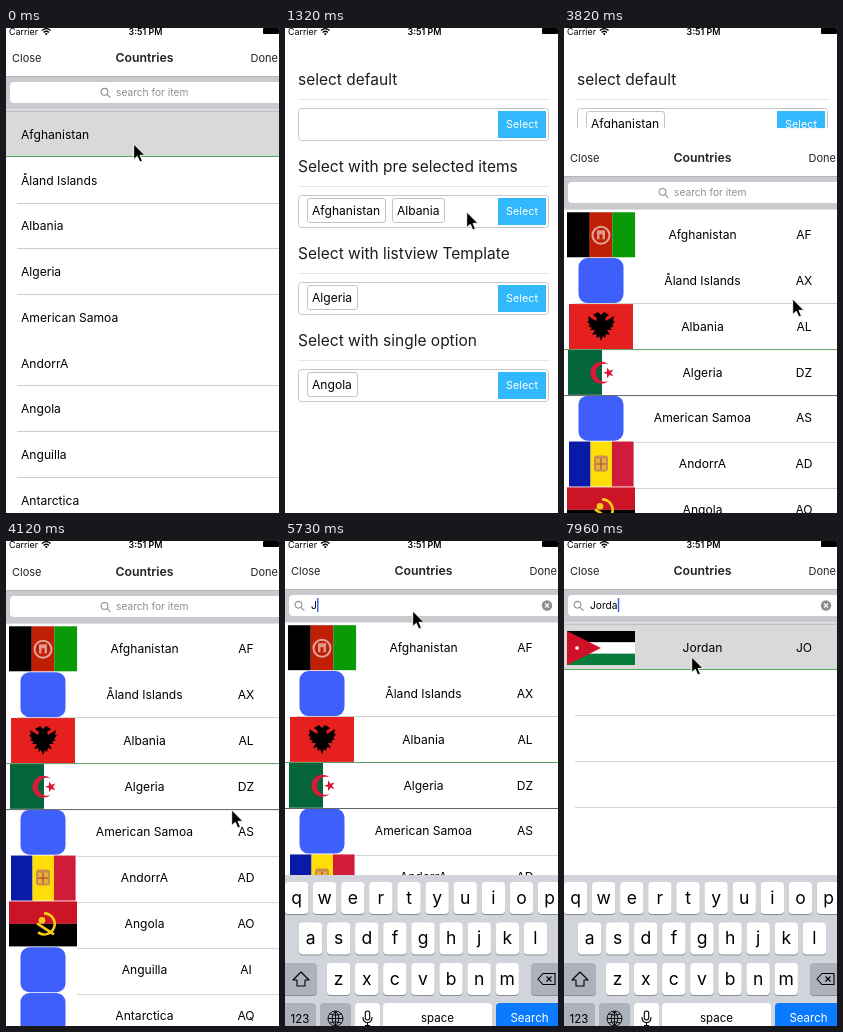
An HTML page for the animation above (8 s loop, 273 by 485 pixels).

```html
<!DOCTYPE html>
<html lang="en">
<head>
<meta charset="utf-8">
<title>Country picker</title>
<style>
html, body { margin: 0; width: 100%; height: 100%; overflow: hidden; background: #fff; }
svg { display: block; width: 273px; height: 485px; font: 12.1px Inter, Roboto, sans-serif; fill: #000; }
.mid { text-anchor: middle; }
.head { font-size: 15.5px; fill: #1c1c1c; }
.nav { font-size: 11px; fill: #222; }
.title { font-size: 12.3px; font-weight: 600; fill: #222; }
.field { font-size: 10.2px; }
.hint { fill: #8e8e93; }
.btn { font-size: 10.8px; fill: #fff; }
.key { font-size: 17.5px; text-anchor: middle; }
.fn { font-size: 11.5px; text-anchor: middle; }
.status { font-size: 8.9px; }
.icon { fill: none; stroke: #000; stroke-width: 1.1; }
</style>
</head>
<body>
<svg id="stage" viewBox="0 0 273 485"></svg>
<script>
const TICK = 147, LOOP = 8000;
const stage = document.getElementById('stage');

const rect = (x, y, w, h, fill, more = '') =>
  `<rect x="${x}" y="${y}" width="${w}" height="${h}" fill="${fill}" ${more}/>`;
const text = (x, y, s, cls = '') => `<text x="${x}" y="${y}" class="${cls}">${s}</text>`;
const path = (d, more = '') => `<path d="${d}" ${more}/>`;
const disc = (x, y, r, fill) => `<circle cx="${x}" cy="${y}" r="${r}" fill="${fill}"/>`;
const group = (id, body) => `<g id="${id}">${body}</g>`;
const line = (x, y, color) => rect(x, y, 273 - x, 1, color);

// Form page
const chip = (x, y, w, s) =>
  rect(x + .5, y + .5, w - 1, 24, '#fff', 'rx="2.5" stroke="#c4c4c4"') + text(x + 5, y + 17, s);

function section(i, title, chips) {
  const y = 87 * i;
  return text(13, 57 + y, title, 'head') + rect(13, 71 + y, 252, 1, '#e6e6e6') +
    rect(13.5, 80.5 + y, 250, 32, '#fff', 'rx="3" stroke="#c8c8c8"') +
    rect(213, 83 + y, 48, 27, '#32b8fd') + text(237, 100 + y, 'Select', 'btn mid') +
    chips.map(([x, w, s]) => chip(x, 83 + y, w, s)).join('');
}

const form = section(0, 'select default', []) +
  group('picked', chip(22, 83, 79, 'Afghanistan')) +
  section(1, 'Select with pre selected items', [[22, 79, 'Afghanistan'], [107, 53, 'Albania']]) +
  section(2, 'Select with listview Template', [[22, 51, 'Algeria']]) +
  section(3, 'Select with single option', [[22, 51, 'Angola']]);

// Flags
const bars = (x, y, w, h, colors) =>
  colors.map((c, i) => rect(x + i * w / 3, y, w / 3 + .1, h, c)).join('');
const stripes = (x, y, w, h, colors) =>
  colors.map((c, i) => rect(x, y + i * h / colors.length, w, h / colors.length, c)).join('');

const flags = {
  AF: y => bars(3, y, 68, 45, ['#000', '#bf1f04', '#0a9a08']) +
    `<circle cx="37" cy="${y + 23}" r="8.5" fill="none" stroke="#e3a39a" stroke-width="2"/>` +
    rect(33, y + 18, 8, 9, '#dd9a8d') + rect(35.5, y + 22, 3, 5, '#bf1f04'),
  AL: y => rect(5, y, 64, 45, '#e5201f') +
    path(`M37 ${y + 11}l-3 -3 -5 3 4 3 -1 3 -8 -5 1 5 -2 0 3 4 -2 1 4 2 -2 2 5 0 -3 5 4 -1 1 4 2 -2
      2 5 2 -5 2 2 1 -4 4 1 -3 -5 5 0 -2 -2 4 -2 -2 -1 3 -4 -2 0 1 -5 -8 5 -1 -3 4 -3 -5 -3z`),
  DZ: y => rect(4, y, 34, 45, '#04653a') + rect(38, y, 33, 45, '#fff') +
    path(`M45 ${y + 15}a11 11 0 1 0 0 16a9 9 0 1 1 0 -16z`, 'fill="#d71a38"') +
    path(`M39 ${y + 23}l4 -1.3 0 -4.1 2.5 3.3 3.9 -1.3 -2.4 3.4 2.4 3.4 -3.9 -1.3 -2.5 3.3 0 -4.1z`,
      'fill="#d71a38"'),
  AD: y => bars(5, y, 64.5, 45, ['#0a1aa8', '#fedd08', '#d11b3b']) +
    rect(30, y + 14, 14, 16, '#c98b4e', 'rx="3"') + rect(32, y + 17, 10, 11, '#e3b23c') +
    path(`M37 ${y + 17}v11M32 ${y + 22.5}h10`, 'stroke="#b5462d" stroke-width="1.2"'),
  AO: y => stripes(3, y, 68, 45, ['#cc1427', '#000']) +
    path(`M38 ${y + 12}a10.5 10.5 0 1 1 -6 19M31 ${y + 22}l17 11`,
      'fill="none" stroke="#f8cb17" stroke-width="2.6"') + disc(36, y + 19, 3.3, '#f8cb17'),
  JO: y => stripes(3, y + 6, 68, 34, ['#000', '#fff', '#087a3c']) +
    path(`M3 ${y + 6}L37 ${y + 23}L3 ${y + 40}z`, 'fill="#ce1126"') + disc(13, y + 23, 1.8, '#fff')
};
const plainIcon = y => rect(14.5, y, 45, 45, '#3f5ffb', 'rx="9"');

// Picker
const names = ['Afghanistan', 'Åland Islands', 'Albania', 'Algeria', 'American Samoa',
  'AndorrA', 'Angola', 'Anguilla', 'Antarctica'];
const codes = ['AF', 'AX', 'AL', 'DZ', 'AS', 'AD', 'AO', 'AI', 'AQ'];
const pressed = rect(0, 83, 273, 45, '#d9d9d9') + line(0, 82.5, '#a9a9a9') + line(0, 128, '#55a95a');

const row = (y, name, code) => (flags[code] || plainIcon)(y) +
  text(138.5, y + 26.8, name, 'mid') + text(240, y + 26.8, code, 'mid');

const plainList = pressed +
  names.map((n, i) => text(15, 110.9 + 45.75 * i, n)).join('') +
  [175, 220, 266, 357, 403, 449].map(y => line(11, y, '#cdcdcd')).join('');
const flagList = names.map((n, i) => row(84.2 + 45.85 * i, n, codes[i])).join('') +
  line(11, 175, '#cdcdcd') + line(0, 221, '#5f9a62') + line(0, 267, '#606066') +
  [314, 360, 406, 452].map(y => line(71, y, '#d4d4d4')).join('');
const foundList = group('hit', pressed) + row(84, 'Jordan', 'JO') +
  [174, 220, 266].map(y => line(11, y, '#d2d2d2')).join('');

const lens = (x, y) => path(`M${x + 3.4} ${y}a3.4 3.4 0 1 1 -6.8 0a3.4 3.4 0 1 1 6.8 0M${x + 2.5} ${y + 2.5}l3.4 3.4`,
  'class="icon" style="stroke:#8e8e93"');

const picker = rect(0, 0, 273, 485, '#fff') +
  group('plain', plainList) + group('flags', flagList) + group('found', foundList) +
  text(6, 34, 'Close', 'nav') + text(138.5, 34.4, 'Countries', 'title mid') + text(244.5, 34, 'Done', 'nav') +
  rect(0, 48, 273, 33.5, '#c9c9ce') + line(0, 48, '#b3b3b7') + rect(4, 54, 275, 21, '#fff', 'rx="4"') +
  group('idle', lens(98.5, 63.8) + text(110, 68, 'search for item', 'field hint')) +
  group('focus', lens(13.5, 63.8) + text(26, 68, 'search for item', 'field hint" id="hint') +
    text(26, 68, '', 'field" id="typed') + rect(25, 57, 1.5, 14, '#4267e8', 'id="caret"')) +
  group('clear', disc(262, 64.5, 5.2, '#8e8e93') +
    path('M260 62.5l4 4m0 -4l-4 4', 'stroke="#fff" stroke-width="1.1"'));

// Keyboard
const key = (x, y, w, fill = '#fff') =>
  rect(x, y + 1, w, 32, '#8a8d92', 'rx="4"') + rect(x, y, w, 32, fill, 'rx="4"');

function keyboard(upper) {
  const fn = upper ? '#b0b8c7' : '#acb2bc';
  const letters = [['qwertyuiop', 11.6, 341], ['asdfghjkl', 25.6, 381.5], ['zxcvbnm', 53.6, 422]]
    .map(([s, x0, y]) => [...s].map((c, i) => {
      const x = x0 + 28.1 * i;
      return key(x - 11.7, y, 23.4) + text(x, y + (upper ? 22.6 : 21.5), upper ? c.toUpperCase() : c, 'key');
    }).join('')).join('');
  return rect(0, 334, 273, 160, upper ? '#ced3dd' : '#d1d4da') + letters +
    key(-5, 422, 37, upper ? '#fff' : fn) +
    path('M16 431l-8 8h4v6h8v-6h4z', `class="icon" stroke-linejoin="round" ${upper ? 'style="fill:#000"' : ''}`) +
    key(246, 422, 40, fn) +
    path('M253 438l5 -5.5h12v11h-12zM261.5 435.5l5 5m0 -5l-5 5', 'class="icon"') +
    key(-5, 462, 36, fn) + text(15, 482, '123', 'fn') +
    key(35, 462, 31, fn) +
    path('M58 477.5a7.5 7.5 0 1 1 -15 0a7.5 7.5 0 1 1 15 0M43 477.5h15M50.5 470v15M44.5 473q6 2.5 12 0M44.5 482q6 -2.5 12 0M50.5 470q-7 7.5 0 15q7 -7.5 0 -15', 'class="icon" style="stroke-width:.9"') +
    key(70, 462, 25) + rect(80.3, 470, 4.4, 9, '#fff', 'rx="2.2" class="icon"') +
    path('M78 476q0 5.5 4.5 5.5t4.5 -5.5M82.5 481.5v3M80 484.5h5', 'class="icon"') +
    key(98, 462, 109) + text(152.5, 481, 'space', 'fn') +
    key(211, 462, 70, upper ? fn : '#0a7aff') +
    `<text x="244.5" y="481" class="fn" style="fill:${upper ? '#858b97' : '#fff'}">Search</text>`;
}

const status = text(3, 6.8, 'Carrier', 'status') +
  path('M36 2.6q4.3 -4 8.6 0M37.7 4.4q2.6 -2.4 5.2 0', 'class="icon" style="stroke-width:1.3"') + disc(40.3, 6, 1.1, '#000') +
  text(139.5, 6.8, '3:51 PM', 'status mid" font-weight="600') + rect(257, 0, 16, 6, '#000', 'rx="1"');

const pointer = path('M.7 1v15.5l3.6 -3.2 2.5 5.7 2.6 -1.1 -2.4 -5.6h4.9z', 'stroke="#fff" stroke-width=".9"');

stage.innerHTML = form + group('picker', picker) +
  group('keys', group('upper', keyboard(true)) + group('lower', keyboard(false))) +
  status + group('pointer', pointer);

// Motion, in ticks
const $ = id => document.getElementById(id);
const show = (id, on) => $(id).setAttribute('visibility', on ? 'inherit' : 'hidden');
const move = (id, x, y) => $(id).setAttribute('transform', `translate(${x} ${y})`);

// Remaining share of a critically damped spring released at tick `from`
function spring(k, from) {
  const u = 18.26 * Math.max(0, k - from) * TICK / 1000;
  return (1 + u) * Math.exp(-u);
}

// Pointer stops and passing points: tick, x, y
const route = [[0, 127, 115], [3, 127, 115], [9, 181, 183], [14, 197, 259], [15, 197, 259],
  [20, 228, 270], [27, 228, 270], [28, 225, 268], [31, 127, 69], [48, 127, 69], [52, 127, 115], [60, 127, 115]];

// Speed at a point: zero next to a rest, otherwise the mean through it
function speed(i, axis) {
  const a = route[i - 1], p = route[i], b = route[i + 1];
  const rest = q => !q || (q[1] === p[1] && q[2] === p[2]);
  return rest(a) || rest(b) ? 0 : (b[axis] - a[axis]) / (b[0] - a[0]);
}

function along(k) {
  const i = route.findIndex(p => p[0] > k), a = route[i - 1], b = route[i];
  const span = b[0] - a[0], u = (k - a[0]) / span, v = 1 - u;
  return [1, 2].map(n => a[n] * v * v * (1 + 2 * u) + b[n] * u * u * (1 + 2 * v) +
    span * u * v * (v * speed(i - 1, n) - u * speed(i, n)));
}

const strokes = [39, 41, 42, 44, 45];

function draw(k) {
  const typed = 'Jorda'.slice(0, strokes.filter(s => k >= s).length);
  const sheet = k < 20 ? 1 - spring(k, .54) : spring(k, 24.9);
  const focus = k >= 34, found = k >= 40;
  const blink = (k >= 37 && k < 39) || (k >= 49 && k < 52);

  show('picked', k >= 10);
  move('picker', 0, 485 * sheet);
  show('plain', k < 20);
  show('flags', k >= 20 && !found);
  show('found', found);
  show('hit', found && k >= 54);
  show('idle', !focus);
  show('focus', focus);
  show('hint', focus && !typed);
  show('clear', typed);
  show('caret', focus && !blink);
  $('typed').textContent = typed;
  $('caret').setAttribute('x', typed ? 26.2 + $('typed').getComputedTextLength() : 25);
  show('keys', focus);
  show('upper', focus && !typed);
  show('lower', typed);
  move('keys', 0, 151 * spring(k, 33.2));
  move('pointer', ...along(k));
}

let last = -1;
const start = performance.now();
function loop() {
  const k = Math.floor(((performance.now() - start) % LOOP + 12) / TICK);
  if (k !== last) draw(last = k);
  requestAnimationFrame(loop);
}
draw(0);
loop();
</script>
</body>
</html>
```
